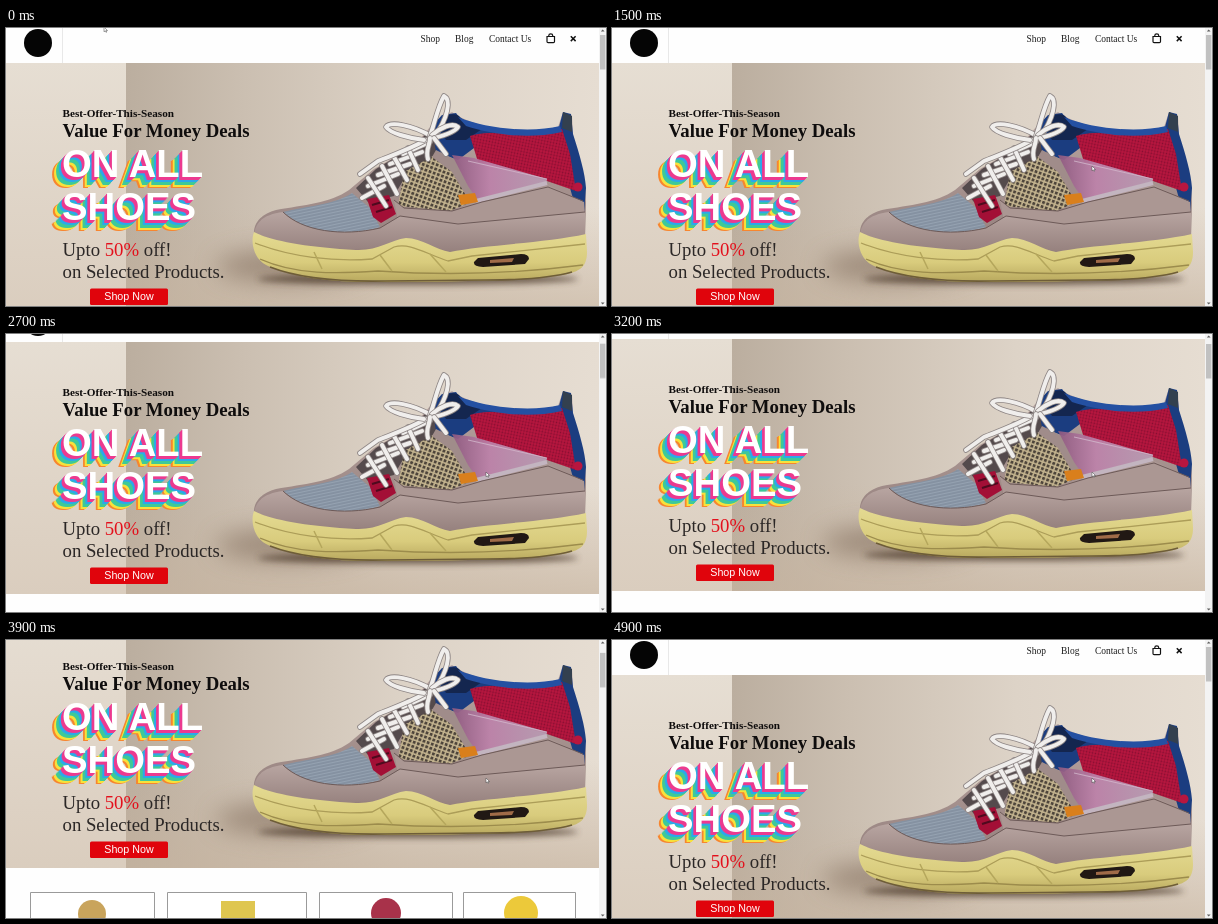
Write an HTML page that moves like this. It is 600 by 278 pixels and loops after 5000 ms.

```html
<!DOCTYPE html>
<html lang="en">
<head>
<meta charset="utf-8">
<title>Shoe shop</title>
<style>
  html, body { margin: 0; width: 100%; height: 100%; overflow: hidden; background: #fefefe; }
  #stage { position: relative; width: 600px; height: 278px; overflow: hidden; background: #fefefe; }
  #page, #page > svg, #ui { position: absolute; left: 0; top: 0; }
  #page { width: 593px; height: 400px; }
  text { font-family: "Liberation Serif", "Times New Roman", serif; fill: #2b2726; }
  .nav text { font-size: 9.45px; fill: #1b1b1b; }
  .bold { font-weight: bold; fill: #0f0d0d; }
  .big { font-size: 18.75px; }
  h1 {
    position: absolute; left: 56px; top: 114.2px; margin: 0; white-space: pre;
    font: bold 38.3px/43px "Liberation Sans", Arial, sans-serif; color: #fff;
  }
</style>
</head>
<body>
<div id="stage">
  <div id="page">
    <svg width="593" height="400" viewBox="0 0 593 400">
      <defs>
        <linearGradient id="wall">
          <stop offset="0" stop-color="#bbae9f"/>
          <stop offset=".25" stop-color="#cbbfb1"/>
          <stop offset=".6" stop-color="#ddd3c7"/>
          <stop offset="1" stop-color="#e6ddd2"/>
        </linearGradient>
        <linearGradient id="side" x2="0" y2="1">
          <stop offset="0" stop-color="#e6ded3"/>
          <stop offset="1" stop-color="#dacdbe"/>
        </linearGradient>
        <linearGradient id="floor" x2="0" y2="1">
          <stop offset="0" stop-color="#c6b39e" stop-opacity="0"/>
          <stop offset="1" stop-color="#c6b39e" stop-opacity=".65"/>
        </linearGradient>
        <linearGradient id="sole" x2="0" y2="1">
          <stop offset="0" stop-color="#e4da92"/>
          <stop offset=".6" stop-color="#d9cc7d"/>
          <stop offset="1" stop-color="#b8a85e"/>
        </linearGradient>
        <linearGradient id="suede" x2="0" y2="1">
          <stop offset="0" stop-color="#b8a5a1"/>
          <stop offset="1" stop-color="#947f7c"/>
        </linearGradient>
        <linearGradient id="wing">
          <stop offset="0" stop-color="#8f5a80"/>
          <stop offset=".4" stop-color="#bd82aa"/>
          <stop offset="1" stop-color="#b79cb2"/>
        </linearGradient>
        <pattern id="net" width="4.4" height="4.4" patternUnits="userSpaceOnUse" patternTransform="rotate(20)">
          <path d="M0 0H5V5H0Z" fill="#4d443a"/>
          <path d="M0 1H5M1 0V5" stroke="#c4b48f" stroke-width="1.6"/>
        </pattern>
        <pattern id="mesh" width="3" height="3" patternUnits="userSpaceOnUse" patternTransform="rotate(12)">
          <path d="M0 0H3V3H0Z" fill="#b8163f"/>
          <circle cx="1.5" cy="1.5" r=".9" fill="#860e31"/>
        </pattern>
        <pattern id="knit" width="3" height="3" patternUnits="userSpaceOnUse" patternTransform="rotate(-12)">
          <path d="M0 0H3V3H0Z" fill="#95a2b1"/>
          <path d="M0 1H3" stroke="#707d8e" stroke-width=".9"/>
        </pattern>
        <filter id="soft" x="-40%" y="-150%" width="180%" height="400%"><feGaussianBlur stdDeviation="3"/></filter>
        <filter id="haze" x="-60%" y="-150%" width="220%" height="400%"><feGaussianBlur stdDeviation="12"/></filter>
      </defs>

      <!-- header -->
      <path d="M56.5 0V35" stroke="#e8e8e8"/>
      <circle cx="32" cy="15" r="14" fill="#050505"/>
      <g class="nav">
        <text x="414.5" y="14">Shop</text>
        <text x="449" y="14">Blog</text>
        <text x="483" y="14">Contact Us</text>
      </g>
      <path d="M541 8.5H548.5V13.5Q548.5 14.6 547.4 14.6H542.1Q541 14.6 541 13.5ZM542.8 8.5V7.5Q542.8 5.8 544.75 5.8T546.7 7.5V8.5" fill="none" stroke="#111" stroke-width="1.2"/>
      <path d="M564.8 8.3L569.6 13.1M569.6 8.3L564.8 13.1" stroke="#111" stroke-width="1.5"/>

      <!-- hero backdrop -->
      <path d="M120 35H593V287H120Z" fill="url(#wall)"/>
      <path d="M0 35H120V287H0Z" fill="url(#side)"/>
      <path d="M120 180H593V287H120Z" fill="url(#floor)"/>

      <!-- shoe -->
      <ellipse cx="285" cy="238" rx="75" ry="16" fill="#7d6856" opacity=".6" filter="url(#haze)"/>
      <ellipse cx="412" cy="251" rx="160" ry="6" fill="#4f3d2f" opacity=".75" filter="url(#soft)"/>
      <path d="M248 207C247 194 256 186 270 182C298 177 324 175 343 162L368 141L408 118L430 92L446 84C470 102 520 106 552 99L557 84L566 88L567 108C573 130 580 150 580 175L579 212L470 226L398 222L300 224Z" fill="url(#suede)"/>
      <path d="M277 184C300 178 328 177 346 165L364 180L374 199C350 207 318 206 298 200Z" fill="url(#knit)"/>
      <path d="M350 160L370 141L408 118L430 96L450 112L434 126L402 144L388 168L362 174Z" fill="#544a4c"/>
      <path d="M426 98L436 87L450 85C458 97 485 103 535 104L553 99L557 84L565 86L567 106C574 128 579 145 580 160L578 184L568 174L556 132L545 112L468 120L452 132L430 124Z" fill="#1b3d80"/>
      <path d="M432 98C438 86 447 84 453 88C458 96 468 99 476 101L460 112L440 112Z" fill="#14264f"/>
      <path d="M464 108C485 101 525 108 556 101L564 126L570 163L538 152L472 134Z" fill="url(#mesh)"/>
      <path d="M452 89C480 101 526 105 554 98L556 104C520 112 486 106 460 98Z" fill="#2450a2"/>
      <path d="M556 100L557 84L566 88L566 104Z" fill="#33404f"/>
      <path d="M398 144L434 124L456 138L472 171L444 183L392 178Z" fill="url(#net)"/>
      <path d="M430 122L454 134L474 173L465 176L446 144L426 129Z" fill="#a08c8a"/>
      <path d="M388 172L398 180L446 183L476 171L542 157L578 174L578 188L452 200L392 192Z" fill="#ab9793"/>
      <path d="M446 127L468 130L541 151L540 157L473 174L462 158Z" fill="url(#wing)" opacity=".93"/>
      <path d="M470 173L541 155" stroke="#c3b5c0" stroke-width="4"/>
      <path d="M462 133L541 151" stroke="#d4b9cd" stroke-width=".8"/>
      <path d="M452 167L469 165L472 174L455 177Z" fill="#d97f1c"/>
      <path d="M361 171L383 167L390 186L375 195L367 189Z" fill="#a30f36"/>
      <path d="M366 177L383 172M370 184L386 179" stroke="#4e0a1e" stroke-width="2.2"/>
      <circle cx="572" cy="159" r="4.5" fill="#b8163f"/>
      <path d="M248 207C249 193 260 186 277 184C296 203 336 209 374 200L394 188L452 196L579 184L579 212L470 226L398 218L300 224Z" fill="url(#suede)"/>
      <path d="M277 184C296 203 336 209 374 200L394 188L452 196L579 184M388 172L398 180L446 183L476 174L542 159L577 173" fill="none" stroke="#6d5a58" stroke-width="1"/>

      <!-- sole -->
      <path d="M248 204C266 213 300 219 350 222C372 223 384 212 400 210C416 210 430 222 444 224C476 217 540 215 580 206L581 224C581 238 575 244 556 247C520 253 440 254 380 254C330 255 290 250 262 238C248 232 244 214 248 204Z" fill="url(#sole)"/>
      <path d="M249 215C284 229 328 234 366 231L388 219C404 214 420 226 442 233L466 228L579 216" fill="none" stroke="#ac9d58" stroke-width="1.3"/>
      <path d="M254 231C290 247 330 246 372 243C430 247 500 247 577 237" fill="none" stroke="#9c8c4c" stroke-width="1.3"/>
      <path d="M308 224L316 241M374 227L386 243M424 226L440 244" stroke="#b5a75c" stroke-width="1.5"/>
      <path d="M264 239C292 250 330 254 380 253L480 252C520 252 548 249 566 244" fill="none" stroke="#6e5d38" stroke-width="1.6"/>
      <path d="M472 230L515 226Q523 226 523 231L519 236L477 239Q467 239 468 234Z" fill="#211814"/>
      <path d="M484 232L508 230L506 234L484 235Z" fill="#a06b48"/>

      <!-- laces -->
      <g id="laces" fill="none" stroke-linecap="round" stroke-linejoin="round">
        <path d="M356 170L378 158M362 158L392 146M372 147L404 136M384 136L416 124M397 126L424 114"/>
        <path d="M362 150L380 178M376 138L391 166M388 129L401 152M402 120L412 142"/>
        <path d="M420 112C402 122 384 128 372 133L354 146"/>
        <path d="M418 112C402 110 384 105 380 99C384 93 406 97 425 108"/>
        <path d="M424 108C429 94 432 78 438 68C446 72 441 91 429 108"/>
        <path d="M426 107C434 100 446 94 452 99C448 105 436 108 428 110"/>
        <path d="M424 110C424 118 419 122 422 131M428 110L440 126"/>
      </g>

      <!-- offer -->
      <text class="bold" x="56.5" y="88.5" font-size="11.2">Best-Offer-This-Season</text>
      <text class="bold big" x="56.5" y="108.5">Value For Money Deals</text>
      <text class="big" x="56.5" y="228">Upto <tspan fill="#e3101c">50%</tspan> off!</text>
      <text class="big" x="56.5" y="249.5">on Selected Products.</text>
      <rect x="84" y="260.5" width="78" height="16.5" rx="1.5" fill="#e0040c"/>
      <text x="98.3" y="272.3" font-size="10.7" style="font-family:'Liberation Sans',Arial,sans-serif;fill:#fff">Shop Now</text>

      <!-- feature cards -->
      <path d="M24.5 311.5H148.5V390H24.5ZM161.5 311.5H300.5V390H161.5ZM313.5 311.5H446.5V390H313.5ZM457.5 311.5H569.5V390H457.5Z" fill="#fff" stroke="#9a9a9a"/>
      <circle cx="86" cy="333" r="14" fill="#c9a45c"/>
      <rect x="215" y="320" width="34" height="28" fill="#dfc650"/>
      <circle cx="380" cy="332" r="15" fill="#a8324a"/>
      <circle cx="515" cy="332" r="17" fill="#ecc93a"/>
    </svg>
    <h1>ON ALL
SHOES</h1>
  </div>

  <svg id="ui" width="600" height="278" viewBox="0 0 600 278">
    <path d="M593 0H600V278H593Z" fill="#f3f3f3"/>
    <path d="M594.8 3.6L596.7 1.4L598.6 3.6ZM594.8 274.4L596.7 276.6L598.6 274.4Z" fill="#606060"/>
    <rect id="thumb" x="594" y="7" width="5.4" height="34.5" fill="#c1c1c1"/>
    <path id="cursor" d="M0 0V4.8L1.2 3.8L2 5.4L2.8 5L2.1 3.5H3.5Z" fill="#fff" stroke="#444" stroke-width=".5"/>
  </svg>
</div>
<script>
const LOOP = 5000;
const $ = id => document.getElementById(id);

// extruded rainbow under the headline
const rainbow = ["#ec3a90", "#2ba9ea", "#3fc998", "#f7e23c", "#f7862f"];
const DEPTH = 12;
document.querySelector("h1").style.textShadow = Array.from({ length: DEPTH }, (_, i) =>
  `${-(i + 1) * 0.95}px ${(i + 1) * 0.95}px 0 ${rainbow[Math.floor(i * rainbow.length / DEPTH)]}`
).join(",");

// each lace is a shaded edge with a white core
for (const lace of [...$("laces").children]) {
  const core = lace.cloneNode();
  lace.setAttribute("stroke", "#8f8786");
  lace.setAttribute("stroke-width", 5.6);
  core.setAttribute("stroke", "#f0eeec");
  core.setAttribute("stroke-width", 4);
  lace.after(core);
}

// one value per 100 ms, starting at the given time
const run = (start, values) => values.map((v, i) => [start + i * 100, v]);

const scroll = [
  [0, 0],
  ...run(2300, [4, 12, 19, 24, 27, 29, 30]),
  ...run(3200, [30, 31, 33, 36, 40, 45, 52, 59, 62, 54, 34, 12, 0]),
];
const pointer = [
  ...run(0, [[98, -1], [230, 4], [400, 8], [486, 9]]),
  ...run(1200, [[486, 30], [484, 75], [482, 120], [480, 138]]),
];

function play(el, rows, transform) {
  const frames = rows.map(([t, v]) => ({ offset: t / LOOP, transform: transform(v), easing: "step-end" }));
  frames.push({ offset: 1, transform: transform(rows[rows.length - 1][1]) });
  el.animate(frames, { duration: LOOP, iterations: Infinity });
}

play($("page"), scroll, s => `translateY(${-s}px)`);
play($("thumb"), scroll, s => `translateY(${s * 0.1}px)`);
play($("cursor"), pointer, ([x, y]) => `translate(${x}px, ${y}px)`);
</script>
</body>
</html>
```
